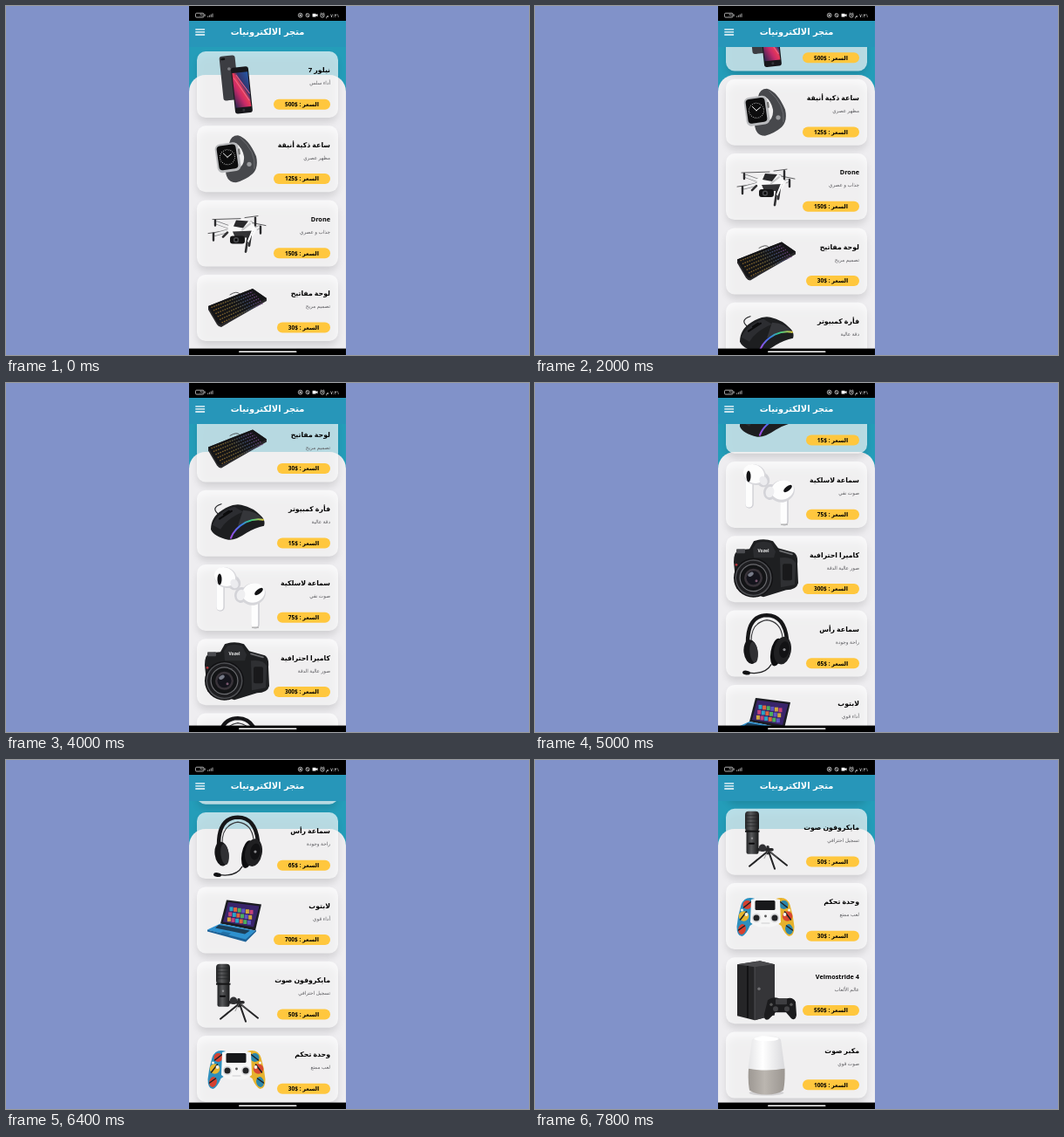
Write an HTML page that moves like this. It is 600 px wide and 400 px high and loops after 8 s.

```html
<!DOCTYPE html>
<html lang="ar">
<head>
<meta charset="utf-8">
<title>متجر الالكترونيات</title>
<style>
  html, body { margin: 0; width: 100%; height: 100%; overflow: hidden; background: #8192c9; }
  svg { display: block; width: 100%; height: 100%; }
  text { direction: rtl; font-family: "Open Sans", "DejaVu Sans", sans-serif; }
  .heading { font: bold 9.9px "DejaVu Sans", sans-serif; fill: #fff; text-anchor: middle; }
  .name { font-size: 7.8px; font-weight: bold; }
  .latin { font-size: 7.3px; }
  .note { font-size: 5.7px; fill: #5c5c60; }
  .price { font-size: 6.5px; font-weight: bold; text-anchor: middle; }
  .status { font-size: 5.6px; fill: #e8e8e8; }
</style>
</head>
<body>
<svg viewBox="0 0 600 400" xmlns="http://www.w3.org/2000/svg">
  <defs>
    <clipPath id="view"><rect x="210" y="47" width="180" height="346"/></clipPath>
    <filter id="soft" x="-20%" y="-30%" width="140%" height="160%"><feGaussianBlur stdDeviation="4"/></filter>
    <linearGradient id="screen" x1="1" y1="0" x2="0" y2="1">
      <stop offset="0" stop-color="#2459a8"/><stop offset=".35" stop-color="#31366f"/>
      <stop offset=".48" stop-color="#e73b58"/><stop offset=".65" stop-color="#c82a69"/>
      <stop offset="1" stop-color="#27264f"/>
    </linearGradient>
    <linearGradient id="rainbow">
      <stop offset="0" stop-color="#a04be0"/><stop offset=".3" stop-color="#3b76ee"/>
      <stop offset=".6" stop-color="#35c98a"/><stop offset="1" stop-color="#d8c840"/>
    </linearGradient>
    <linearGradient id="keys">
      <stop offset="0" stop-color="#8a6428"/><stop offset=".45" stop-color="#6f6235"/>
      <stop offset=".7" stop-color="#3b4f70"/><stop offset="1" stop-color="#70407a"/>
    </linearGradient>
    <linearGradient id="pearl">
      <stop offset="0" stop-color="#e4e4e6"/><stop offset=".4" stop-color="#fff"/><stop offset="1" stop-color="#d9d9dc"/>
    </linearGradient>
    <linearGradient id="fabric">
      <stop offset="0" stop-color="#9d9893"/><stop offset=".45" stop-color="#bbb6b0"/><stop offset="1" stop-color="#9b9691"/>
    </linearGradient>
    <linearGradient id="metal">
      <stop offset="0" stop-color="#222325"/><stop offset=".4" stop-color="#58595b"/><stop offset="1" stop-color="#18191a"/>
    </linearGradient>
  </defs>

  <rect width="600" height="400" fill="#8192c9"/>
  <rect x="210" width="180" height="400" fill="#249db9"/>
  <path d="M210 393V98a19 19 0 0 1 19-19H371a19 19 0 0 1 19 19V393Z" fill="#eeedf0"/>
  <g clip-path="url(#view)"><g id="list"></g></g>

  <rect x="210" y="17" width="180" height="30" fill="#2796b9"/>
  <rect x="210" width="180" height="17" fill="#000"/>
  <g fill="none" stroke="#d8d8d8" stroke-width=".8">
    <rect x="217.5" y="8.2" width="9.5" height="4.8" rx="1.2"/>
    <path d="M228.2 9.5v2.2M231.6 12.8v-1.2M233.4 12.8v-2.2M235.2 12.8v-3.2M237 12.8v-4.2"/>
    <circle cx="337.7" cy="10.6" r="2.4"/><path d="M336.6 10.6h2.2" stroke-width="1.8"/>
    <circle cx="346" cy="10.6" r="2"/><path d="M344.4 9l3.2 3.2"/>
    <circle cx="363" cy="10.9" r="2.2"/><path d="M363 9.6v1.4h1M360.5 9l1.3-1.2M365.5 9l-1.3-1.2"/>
  </g>
  <path d="M351.6 8.7h3.9v1.4l2-1.2v3.4l-2-1.2v1.4h-3.9z" fill="#fff"/>
  <text class="status" x="224.2" y="12.1" style="font-size:3.8px;direction:ltr;text-anchor:middle">70</text>
  <text class="status" x="382.5" y="12.6">٧:٣١ م</text>

  <path d="M217.3 26.8h10.8M217.3 29.9h10.8M217.3 33h10.8" stroke="#fff" stroke-width="1.3"/>
  <text class="heading" x="300" y="33">متجر الالكترونيات</text>
  <rect x="210" y="392.6" width="180" height="7.4" fill="#000"/>
  <rect x="267" y="395.4" width="66.5" height="1.7" rx=".8" fill="#fff"/>
</svg>
<script>
const PITCH = 85.3, FIRST_TOP = 52, LOOP = 8000, STEP = 200;

const path = (d, fill) => `<path d="${d}" fill="${fill}"/>`;
const line = (d, color, width) =>
  `<path d="${d}" fill="none" stroke="${color}" stroke-width="${width}" stroke-linecap="round" stroke-linejoin="round"/>`;
const oval = (x, y, rx, ry, fill, turn = 0) =>
  `<ellipse cx="${x}" cy="${y}" rx="${rx}" ry="${ry}" fill="${fill}" transform="rotate(${turn} ${x} ${y})"/>`;
const dot = (x, y, r, fill) => oval(x, y, r, r, fill);
const box = (x, y, w, h, r, fill) => `<rect x="${x}" y="${y}" width="${w}" height="${h}" rx="${r}" fill="${fill}"/>`;
const turned = (angle, x, y, body) => `<g transform="rotate(${angle} ${x} ${y})">${body}</g>`;

const phone = () =>
  turned(-6, 256, 30, box(247, 5, 18, 51, 3, '#3c3d42') + box(248.5, 7, 5, 2.6, 1.3, '#111') + dot(257, 20, 1.8, '#7c7d82')) +
  turned(-6, 270, 45, box(260.5, 18, 20, 53, 3, '#17171b') + box(261.6, 24, 17.8, 40, 0, 'url(#screen)') +
    line('M263 30L278 57M266 27L279 49', '#f0668a', 1) + dot(270.5, 67.4, 1.5, '#34343a'));

const watch = () =>
  path('M256 20Q258 11 266 11Q278 14 287 35Q290 48 283 55Q275 62 264 65Q253 65 252 52L265 50Q274 46 273 35Q271 25 264 20Z', '#47484c') +
  line('M269 14Q287 29 285 49', '#6b6c70', 1) + dot(279, 44, 2.6, '#9a9b9e') +
  turned(-8, 254, 36, box(241, 20, 27, 33, 6, '#b9babd') + box(243, 22, 22, 28, 4, '#0c0c0d') +
    box(267, 28, 2.3, 7, 1, '#777') +
    '<circle cx="254" cy="36" r="8.5" fill="none" stroke="#d5d5d5" stroke-width="1" stroke-dasharray=".8 1.43"/>' +
    line('M254 36L250 31M254 36L259 33', '#fff', .9));

const drone = () =>
  line('M237 22L269 21M232 38L246 36M274 20L289 18M283 26L298 29', '#4b4b4d', .9) +
  line('M242 26L259 32M240 39L259 34M281 26L274 31M290 31L279 36', '#77777a', 4.2) +
  line('M242 26L259 32M240 39L259 34M281 26L274 31M290 31L279 36', '#eeeeef', 3) +
  line('M240 23V29M238 38V46M286 20V29M292 30V38', '#2b2b2d', 2.4) +
  path('M255 29L265 23L281 25L288 34L282 43L263 44L254 38Z', '#f8f8f8') +
  path('M264 23L278 24L272 32L261 30Z', '#29292b') + path('M260 36L284 35L279 43L263 43Z', '#353537') +
  line('M271 34L280 27', '#c9c9ca', 2) + line('M278 39L275 59M281 38L279 52M254 37L249 42', '#303032', 2.6) +
  line('M284 32L278 47', '#fff', 2) +
  box(257, 41, 17, 9, 3, '#151516') + dot(264, 45.5, 3.2, '#48494c') + dot(264, 45.5, 1.5, '#050506');

const keyboard = () => {
  let rows = '';
  for (let i = 0; i < 6; i++) {
    const x = 235.5 + i * 2.4, y = 37.6 + i * 3.5;
    rows += `<path d="M${x} ${y}l47.5 ${-18 - i * .9}" stroke="url(#keys)" stroke-width="1.3" stroke-dasharray="1.6 1.2"/>`;
  }
  return line('M268 22Q265 18 257 23', '#333', .8) +
    path('M232 36L283 16L299 27V30L247 60Q244 60 242 57L232 40Z', '#2a292b') +
    path('M232 36L283 16L299 27L247 57Q244 57 242 54Z', '#151517') + rows;
};

const mouse = () =>
  line('M243 27Q235 20 247 16', '#26272a', 1.2) +
  path('M235 45Q235 31 248 23Q260 15 270 17Q284 20 293 30Q298 35 296 41Q286 43 276 49Q263 58 255 57Q238 53 235 45Z', '#1d1e20') +
  path('M237 40Q243 25 262 19L272 25Q254 32 246 45Z', '#2c2d31') + path('M272 23Q288 24 295 34Q280 33 266 41Z', '#35363a') +
  line('M245 33L259 24M250 28L256 24', '#0b0b0c', 2) +
  line('M258 55Q262 44 275 37Q285 32 295 34', 'url(#rainbow)', 2);

const earbuds = () =>
  line('M246 18V49', '#cfcfd4', 9.5) + line('M245.4 17V48.4', '#fdfdfd', 8) +
  oval(261.5, 21, 7.5, 8.5, '#d3d3d8', -25) + oval(252, 15, 13.5, 11.5, '#d8d8dc', 30) +
  oval(251, 14, 12.5, 10.5, '#fdfdfd', 30) + oval(262, 22, 4.3, 5.5, '#ececef', -30) +
  oval(245, 17, 2.5, 6.5, '#131315') +
  line('M286 38V69', '#cbcbd0', 9.5) + line('M285.2 37V68.4', '#fdfdfd', 8) +
  oval(270, 35, 8, 9, '#d3d3d8', 15) + oval(283.5, 34, 14.5, 12.5, '#d6d6da', -18) +
  oval(284, 32.5, 13, 11, '#fdfdfd', -18) + oval(269.5, 35, 4.8, 6.3, '#efeff1', 15) +
  oval(290, 31, 5.8, 2.6, '#131315', -38) + box(282, 71.4, 8, 1.4, .6, '#aaa');

const camera = () =>
  path('M228 30Q228 18 234 16L246 15L251 6Q262 2 273 6L279 14L297 19Q302 22 301 32L302 54Q300 62 288 62L262 70L231 60Z', '#1e1f21') +
  path('M250 14L254 8Q262 5 271 8L276 18L274 25L251 25Z', '#2b2c2f') + box(231, 15, 10, 5, 1, '#4a4b4f') +
  path('M281 25Q295 23 299 31L298 56L282 59Z', '#2f3033') + line('M281 17L295 21', '#6a6b6e', 1.8) +
  box(284, 32, 11, 19, 2, '#19191b') + dot(231, 33, 1.4, '#b4343b') +
  '<text x="262" y="18.5" fill="#eee" style="font-size:5px;font-weight:bold;direction:ltr;text-anchor:middle">Vozel</text>' +
  [[22.5, '#111113'], [21, '#4d4e52'], [19.5, '#1d1d20'], [16, '#6b6c70'], [14.8, '#131416'], [10.5, '#39343a'], [8, '#14141c']]
    .map(([r, fill]) => dot(250.5, 48, r, fill)).join('') +
  oval(247.5, 44, 3.5, 2.2, '#777b88', -30) + dot(254, 51.5, 1.5, '#7a586f');

const headphones = () =>
  line('M244 37Q244 6 266 5.5Q286 6 289 33', '#161618', 4.4) + line('M248 35Q248 14 266 11Q282 13 284 31', '#39393c', 1.1) +
  oval(247.5, 47.5, 8, 14, '#151517', -7) + oval(251, 48, 4.6, 12, '#303033', -7) +
  oval(277, 48, 6.6, 16, '#0d0d0f', 10) + oval(284, 46, 9.8, 16, '#202022', 10) + oval(286, 45, 5.8, 9.5, '#121214', 10) +
  dot(286, 45, 1.6, '#8a8a8d') +
  line('M271 62Q264 74 245 71.5', '#202022', 1.2) + oval(242.5, 71.5, 4.5, 2.4, '#111113', 8);

const laptop = () => {
  const tints = ['#2aa5c7', '#c5427b', '#d2a63c', '#5f56c1', '#4caf5d', '#df663d'];
  let tiles = '';
  for (let i = 0; i < 18; i++) {
    const col = i % 6, row = Math.floor(i / 6);
    tiles += box(256.5 + col * 4.6 - row * 1.3, 23 + col * .7 + row * 6, 4, 4.8, 0, tints[(i * 5 + row) % 6]);
  }
  return path('M253 15L293 20L286 50L246 42Z', '#1b1c22') + path('M255 17.5L290.5 22L284 46L249 40Z', '#39246a') + tiles +
    path('M246 42L286 50L275 61L231 49Z', '#2e91cf') + path('M244 43.5L280 50L274 54L240 47Z', '#1c3e58') +
    path('M249 51L258 53L254 56L245 53.5Z', '#2472a7') + path('M231 49L275 60L287 49V51L275 63L231 51Z', '#1d6298');
};

const microphone = () =>
  line('M256 47H272M267 44V51', '#28282a', 3.5) + dot(261, 45, 4.2, '#303033') +
  line('M267 49L246 66M268 49L275 69M269 49L289 65', '#242426', 2) + line('M267 49L263 57M269 49L278 56', '#777', .7) +
  box(241, 3, 16, 23, 4, 'url(#metal)') + box(242.5, 24, 14, 28, 2, 'url(#metal)') +
  line('M243 8H255M243 12H255M243 16H255M243 20H255', '#222325', .7) + box(241, 25, 16.5, 2, 0, '#151516') +
  dot(249, 34, 1.2, '#8d8d90') + box(245, 39, 7, 2, 1, '#0b0b0c');

const gamepad = () => {
  const half = (side, a, b, c) => {
    const x = d => 264.5 + side * d;
    return path(`M${x(12)} 18Q${x(24)} 14 ${x(28)} 25Q${x(32)} 38 ${x(33)} 50Q${x(33)} 61 ${x(27)} 61Q${x(22)} 59 ${x(18)} 49L${x(12)} 45Z`, a) +
      dot(x(21), 25, 5, c) + dot(x(25), 38, 5.8, b) + oval(x(27), 53, 4.3, 6, c, side * -12) +
      line(`M${x(16)} 21L${x(25)} 28M${x(22)} 33L${x(29)} 42M${x(24)} 49L${x(31)} 54`, '#1e2026', 1.5) +
      dot(x(22), 36, 1.9, '#f4f1e6') + dot(x(27), 31, 1.6, '#f4f1e6');
  };
  return half(-1, '#2d8fbd', '#e7b62e', '#d6402f') + half(1, '#e6b22d', '#d84932', '#2b86aa') +
    path('M248 19Q264 15 281 19L282 45Q274 52 264 50Q254 52 247 45Z', '#f6f6f6') +
    box(252.5, 20, 23, 11, 1.5, '#18191b') + [254, 275].map(x => dot(x, 40, 5.2, '#d9d9db') + dot(x, 40, 3.5, '#232426')).join('') +
    dot(264.5, 38, 1.4, '#555') + line('M260 46H269', '#c2c2c4', .8);
};

const gameConsole = () =>
  path('M232 8L258 4L275 8V66L252 72L232 67Z', '#252527') + path('M252 11L275 8V66L252 72Z', '#353538') +
  path('M232 8L258 4L275 8L252 11Z', '#4b4b4e') + line('M244 10V69', '#080809', 1.2) + line('M252 11V71', '#626265', .6) +
  dot(257, 36, 1.7, '#717174') +
  path('M267 49Q273 44 280 47H289Q296 45 299 51L300 66Q299 73 294 70L288 63H276L268 71Q262 73 263 65Z', '#1b1b1d') +
  box(276, 47.5, 13, 6.5, 1, '#3e3e41') + dot(276, 59, 3, '#424245') + dot(289, 59, 3, '#424245') +
  dot(271, 54, 1.7, '#555') + dot(294, 54, 1.7, '#555');

const speaker = () =>
  oval(265.5, 70, 20, 3, '#d2d1d3') +
  path('M245 42Q244 57 246 67Q253 72 265.5 72Q278 72 285 67Q287 57 286.5 42Z', 'url(#fabric)') +
  path('M249 9Q253 4.5 265.5 4.5Q278 4.5 282 9L286.5 42Q277 44 265.5 44Q253 44 244.5 42Z', 'url(#pearl)') +
  oval(265.5, 8, 14, 2.6, '#fff');

const products = [
  ['نيلور 7', 'أداء سلس', 500, phone],
  ['ساعة ذكية أنيقة', 'مظهر عصري', 125, watch],
  ['Drone', 'جذاب و عصري', 150, drone],
  ['لوحة مفاتيح', 'تصميم مريح', 30, keyboard],
  ['فأرة كمبيوتر', 'دقة عالية', 15, mouse],
  ['سماعة لاسلكية', 'صوت نقي', 75, earbuds],
  ['كاميرا احترافية', 'صور عالية الدقة', 300, camera],
  ['سماعة رأس', 'راحة وجودة', 65, headphones],
  ['لابتوب', 'أداء قوي', 700, laptop],
  ['مايكروفون صوت', 'تسجيل احترافي', 50, microphone],
  ['وحدة تحكم', 'لعب ممتع', 30, gamepad],
  ['Velmostride 4', 'عالم الألعاب', 550, gameConsole],
  ['مكبر صوت', 'صوت قوي', 100, speaker],
];

const card = ([name, note, price, draw], i) => {
  const width = price > 99 ? 65 : 61;
  // Latin names are isolated so the trailing digit stays on their right.
  const isLatin = /[a-z]/i.test(name);
  const label = isLatin ? `\u2066${name}\u2069` : name;
  return `<g transform="translate(0 ${FIRST_TOP + i * PITCH})">
    <rect x="220" y="6" width="160" height="75" rx="10" fill="#000" opacity=".12" filter="url(#soft)"/>
    <rect x="219" width="162" height="76" rx="10" fill="#fff" opacity=".68"/>
    ${draw()}
    <text class="name ${isLatin ? 'latin' : ''}" x="372" y="24.3">${label}</text>
    <text class="note" x="372" y="38.3">${note}</text>
    ${box(372 - width, 54.7, width, 12, 6, '#ffc73e')}
    <text class="price" x="${372 - width / 2}" y="63.1">السعر : \u2066${price}$\u2069</text>
  </g>`;
};

const list = document.getElementById('list');
list.innerHTML = products.map(card).join('');

// Time and scroll distance; slopes come from the neighbouring points.
const stops = [[0, 0], [2000, 53.5], [3200, 157.5], [4000, 270.5], [5000, 388.5], [6400, 589], [7800, 764]];
const slopes = stops.map((_, i) => {
  if (i === 0) return 0;
  const a = stops[i - 1], b = stops[Math.min(i + 1, stops.length - 1)];
  return (b[1] - a[1]) / (b[0] - a[0]);
});

function scrollAt(time) {
  const i = Math.min(stops.findLastIndex(s => s[0] <= time), stops.length - 2);
  const [t0, y0] = stops[i], [t1, y1] = stops[i + 1];
  const span = t1 - t0, u = (time - t0) / span, v = 1 - u;
  return y0 * v * v * (1 + 2 * u) + y1 * u * u * (3 - 2 * u) +
    span * u * v * (slopes[i] * v - slopes[i + 1] * u);
}

function frame() {
  const time = Math.floor(performance.now() % LOOP / STEP) * STEP;
  list.setAttribute('transform', `translate(0 ${-scrollAt(time).toFixed(2)})`);
  requestAnimationFrame(frame);
}
frame();
</script>
</body>
</html>
```
